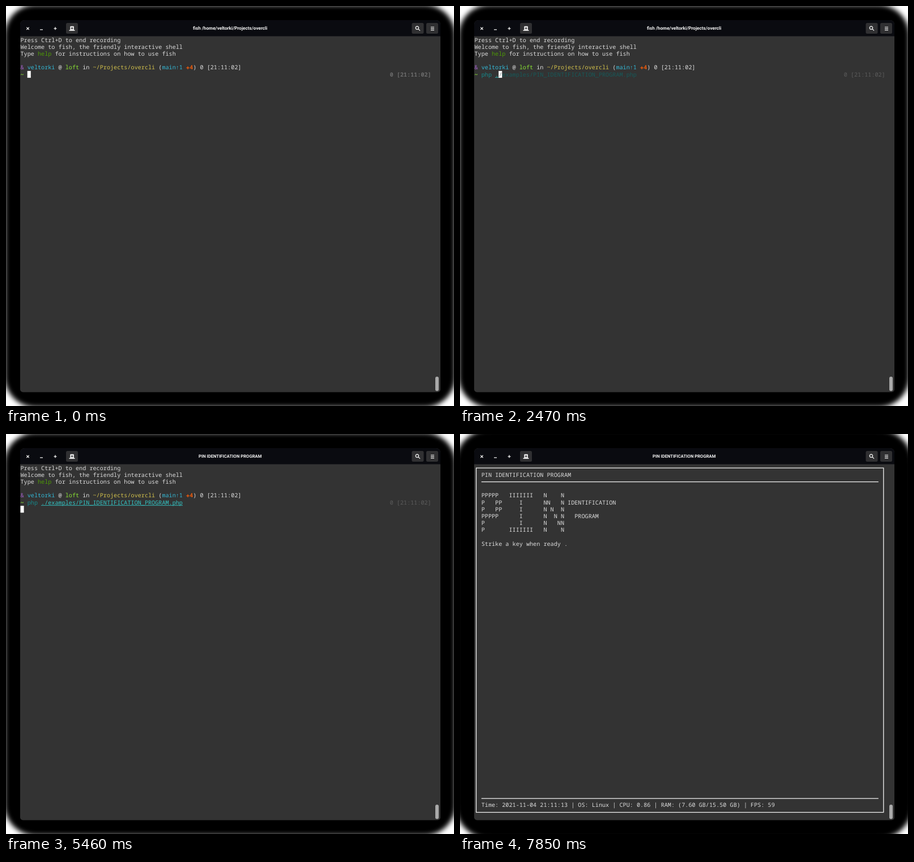
An HTML page with a canvas that plays this animation: 791x708 px, repeating every 8 s.

```html
<!DOCTYPE html>
<html lang="en">
<head>
<meta charset="utf-8">
<title>Terminal session</title>
<style>
html, body { margin: 0; width: 791px; height: 708px; overflow: hidden; background: #fff; }
canvas { display: block; }
</style>
</head>
<body>
<canvas id="stage" width="791" height="708"></canvas>
<script>
const ctx = document.getElementById('stage').getContext('2d');
const LOOP = 8000, LEFT = 25.5, TOP = 54, COL = 6.095, ROW = 12.18;
const MONO = '10.16px "Noto Sans Mono", "DejaVu Sans Mono", monospace';
const TEXT = '#dcdcdc', CYAN = '#34b8d6', LIME = '#8ae234', ORANGE = '#e8590c';
const COMMAND = 'php ./examples/PIN_IDENTIFICATION_PROGRAM.php';
const LAUNCH = 5460, PROGRAM = 5740;

// [time, typed text or number of command letters, cursor hidden]
const STEPS = [
  [0, 0], [250, 0, true], [540, 0], [810, 0, true], [1080, 1], [1360, 4],
  [1640, 'php e'], [1920, 'php e', true], [2190, 'php exam'], [2470, 5], [2750, 6],
  [3030, 7], [3280, 9], [3550, 10], [3830, 13], [4110, 14], [4370, 15], [4640, 16],
  [4910, 17], [5190, 45], [LAUNCH, 45], [PROGRAM], [6010], [6270], [6530], [6800],
  [7050], [7310], [7580], [7850]
];

const BANNER = [
  'PPPPP   IIIIIII   N    N',
  'P   PP     I      NN   N IDENTIFICATION',
  'P   PP     I      N N  N',
  'PPPPP      I      N  N N   PROGRAM',
  'P          I      N   NN',
  'P       IIIIIII   N    N'
];

const colX = col => LEFT + col * COL;
const rowY = row => TOP + row * ROW;

function box(x, y, w, h, radius, color) {
  ctx.fillStyle = color;
  ctx.beginPath();
  ctx.roundRect(x, y, w, h, radius);
  ctx.fill();
}

function stroke(path, color = '#f2f2f2', width = 1.3) {
  ctx.strokeStyle = color;
  ctx.lineWidth = width;
  ctx.stroke(new Path2D(path));
}

// Writes on the character grid and returns the next free column.
function put(col, row, text, color = TEXT, weight = '') {
  ctx.font = `${weight} ${MONO}`;
  ctx.fillStyle = color;
  for (const char of text) ctx.fillText(char, colX(col++), rowY(row) + 9.6);
  return col;
}

function putRuns(row, runs) {
  runs.reduce((col, [text, color, weight]) => put(col, row, text, color, weight), 0);
}

function drawShadow(time) {
  const spread = time < 4640 ? 2 : time < PROGRAM ? 2.5 : time < 7850 ? 4 : 8;
  ctx.fillStyle = '#fff';
  ctx.fillRect(0, 0, 791, 708);
  ctx.filter = 'blur(4px)';
  box(-spread, -spread, 791 + 2 * spread, 708 + 2 * spread, 52 + spread, '#000');
  ctx.filter = 'none';
}

function drawWindow(time) {
  box(25, 25, 742, 658.5, [8, 8, 5, 5], '#333');
  box(25, 25, 742, 28.5, [8, 8, 0, 0], '#0a0b10');
  box(758, 656, 6, 25.5, 3, '#a9a9a9');

  for (const x of [106, 716.5, 742]) box(x, 30, 21, 19, 2.5, '#303032');
  stroke('M36.3 37.6l4.4 4.4M40.7 37.6l-4.4 4.4M60 41.8h5M84.5 39.8h5M87 37.3v5');
  stroke('M725.9 36a2.7 2.7 0 1 0 .1 0M728 40.6l3 3');
  stroke('M750 37.2h6M750 39.9h6M750 42.6h6', '#f2f2f2', 1.1);
  box(113.3, 35.8, 6.6, 7, 1, '#f2f2f2');
  box(111.5, 42.4, 10, 1.6, 0, '#f2f2f2');
  stroke('M114.6 39.4h4M116.6 37.4v4', '#303032', 1.1);

  const [title, size] = time < LAUNCH
    ? ['fish /home/veltorki/Projects/overcli', 8.2]
    : ['PIN IDENTIFICATION PROGRAM', 7.7];
  ctx.font = `bold ${size}px Roboto, sans-serif`;
  ctx.fillStyle = '#f4f4f4';
  ctx.textAlign = 'center';
  ctx.fillText(title, 395.7, 42.3);
  ctx.textAlign = 'left';
}

function drawShell(time, entry, cursorHidden) {
  const typed = typeof entry === 'string' ? entry : COMMAND.slice(0, entry);
  const ghost = typed && COMMAND.startsWith(typed) ? COMMAND.slice(typed.length) : '';
  const path = typed.slice(4);

  put(0, 0, 'Press Ctrl+D to end recording');
  put(0, 1, 'Welcome to fish, the friendly interactive shell');
  putRuns(2, [['Type '], ['help', '#4e9a06'], [' for instructions on how to use fish']]);
  putRuns(4, [
    ['& ', '#a05fc4'], ['veltorki', CYAN], [' @ '], ['loft', LIME], [' in '],
    ['~/Projects/overcli', '#d2c04c'], [' ('], ['main↑1 ', CYAN],
    ['✚4', ORANGE, 'bold'], [') 0 [21:11:02]']
  ]);

  putRuns(5, [
    ['~ ', LIME, 'bold'],
    [typed.slice(0, 4), typed.length < 3 ? '#d9711f' : '#16898b'],
    [path, '#33c4c4'],
    [ghost, '#175a5a']
  ]);
  if (path) {
    ctx.fillStyle = '#33c4c4';
    ctx.fillRect(colX(6), rowY(5) + 11, path.length * COL, 0.9);
  }
  put(107, 5, '0 [21:11:02]', typed ? '#5c5c5c' : '#6c6c6c', typed ? '' : 'bold');

  if (cursorHidden) return;
  const launched = time >= LAUNCH;
  const col = launched ? 0 : typed.length + 2, row = launched ? 6 : 5;
  box(colX(col), rowY(row), COL, ROW, 0, '#fff');
  if (ghost) put(col, row, ghost[0], typed.length < 3 ? '#d9a27c' : '#7a8585');
}

function drawProgram(time, ticks) {
  const second = 11 + (time >= 6800) + (time >= 7850);
  const memory = time < 7050 ? '7.61' : '7.60';
  stroke('M28.6 60.2H747.8V669.7H28.6ZM37.8 84.6H738.8M37.8 645.2H738.8');
  put(2, 1, 'PIN IDENTIFICATION PROGRAM');
  BANNER.forEach((line, i) => put(2, 4 + i, line));
  put(2, 11, 'Strike a key when ready ' + (ticks % 2 ? '..' : '.'));
  put(2, 49, `Time: 2021-11-04 21:11:${second} | OS: Linux | CPU: 0.86 | RAM: (${memory} GB/15.50 GB) | FPS: 59`);
}

let shown = -1;
function frame() {
  const now = performance.now() % LOOP;
  const index = STEPS.findLastIndex(([start]) => start <= now);
  if (index !== shown) {
    shown = index;
    const [time, entry, cursorHidden] = STEPS[index];
    ctx.textRendering = 'geometricPrecision';
    drawShadow(time);
    drawWindow(time);
    if (time < PROGRAM) drawShell(time, entry, cursorHidden);
    else drawProgram(time, index - STEPS.findIndex(([start]) => start === PROGRAM));
  }
  requestAnimationFrame(frame);
}
frame();
</script>
</body>
</html>
```
